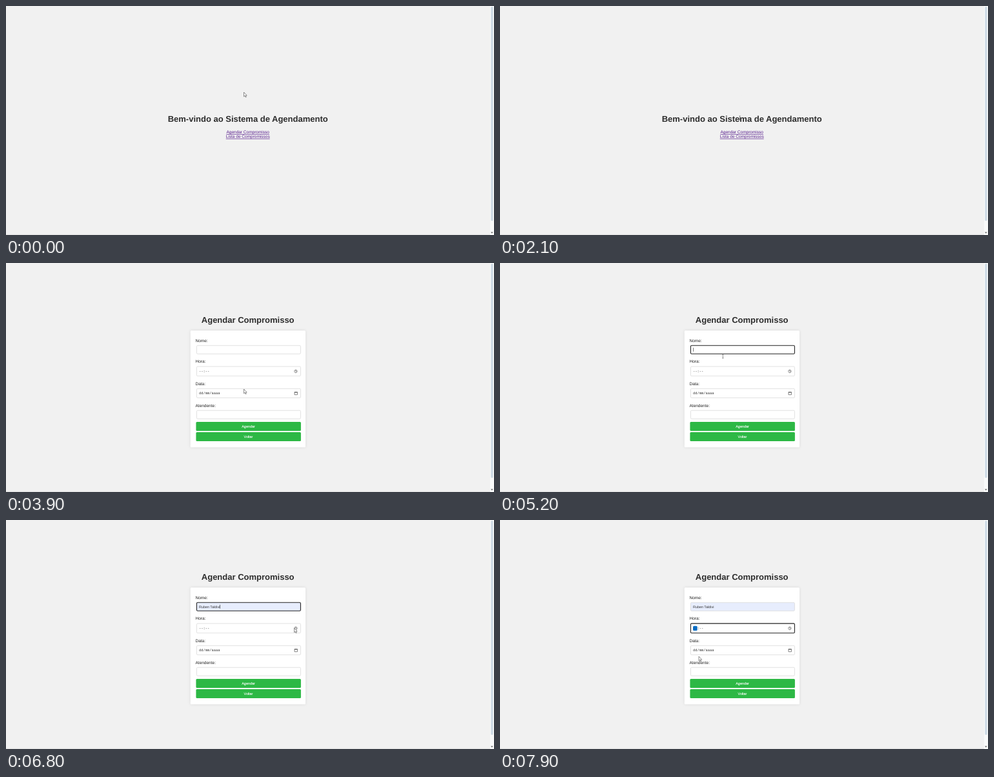
These frames come from a looping animation (756x356 px, 8000 ms). An HTML page:

```html
<!DOCTYPE html>
<html lang="pt-BR">
<head>
<meta charset="utf-8">
<title>Sistema de Agendamento</title>
<style>
  html, body { margin: 0; width: 100%; height: 100%; overflow: hidden; background: #f1f1f1; }
  svg { display: block; }
  text { font: 6.5px "Liberation Sans", Arial, sans-serif; fill: #222; text-rendering: geometricPrecision; }
  .title { font-size: 13px; font-weight: bold; fill: #2d2d2d; text-anchor: middle; }
  .link { fill: #551a8b; text-anchor: middle; text-decoration: underline; }
  .value { font-size: 5.42px; fill: #333; }
  .mono { font-family: "Liberation Mono", monospace; }
  .button { font-size: 5.42px; fill: #fff; stroke: #fff; stroke-width: .12; text-anchor: middle; }
  .field { fill: #fff; stroke: #dadada; stroke-width: .8; }
  .filled { fill: #e7edfd; }
  .focus { stroke: #222; stroke-width: 1.1; }
  .card { fill: #fff; filter: drop-shadow(0 0 2px rgba(0, 0, 0, .1)); }
  .icon { fill: none; stroke: #333; stroke-width: .6; }
  .cursor { fill: #fff; stroke: #444; stroke-width: .6; stroke-linejoin: round; }
</style>
</head>
<body>
<svg width="756" height="356">
  <rect y="355" width="750" height="1" fill="#e2e2e2"/>
  <rect x="750" width="6" height="356" fill="#f9fafa"/>
  <rect x="751.3" y="1" width="3.2" height="333" rx="1.5" fill="#ccd9e4"/>
  <path d="M751 351.5h3.6l-1.8 2z" fill="#555"/>
  <g id="home"></g>
  <g id="form"></g>
  <path id="cursor" class="cursor"/>
</svg>
<script>
const LOOP = 8000, STEP = 100, CENTER = 374.7, LEFT = 295.4;
const NAME = "Ruben Taldivi";
const $ = id => document.getElementById(id);
const text = (kind, x, y, content, id = "") =>
  `<text id="${id}" class="${kind}" x="${x}" y="${y}">${content}</text>`;
const box = (kind, x, y, w, h, id = "") =>
  `<rect id="${id}" class="${kind}" x="${x}" y="${y}" width="${w}" height="${h}" rx="1.5"/>`;

$("home").innerHTML = text("title", CENTER, 180.4, "Bem-vindo ao Sistema de Agendamento") +
  ["Agendar Compromisso", "Lista de Compromissos"]
    .map((label, i) => text("link", CENTER, 198 + i * 7.4, label)).join("");

// Labels and fields stack downwards; each row gives its label, height and content.
function buildForm() {
  const fields = [
    ["Nome:", 13, y => text("value", 299, y, "", "name")],
    ["Hora:", 14.8, y => box("", 299, y - 5.5, 6.6, 7.2, "hourMark") + text("value mono", 299, y, "--:--") +
      `<path class="icon" d="M446.7 ${y - 2}a2.2 2.2 0 1 1 0 .1M448.9 ${y - 3.5}v1.6l1.1.6"/>`],
    ["Data:", 14.3, y => text("value mono", 299, y, "dd/mm/aaaa") +
      `<path class="icon" d="M447 ${y - 3.8}h4.4v4.1H447zm0 .6h4.4"/>`],
    ["Atendente:", 13, () => ""]
  ];
  let y = 122.7;
  let markup = text("title", CENTER, 92.6, "Agendar Compromisso") + box("card", 285.7, 105, 178.3, 181.5);
  for (const [label, height, content] of fields) {
    markup += text("", 293.5, y, label) + box("field", LEFT, y + 5.6, 161, height, label) +
      content(y + 7.6 + height / 2);
    y += height + 19.6;
  }
  ["Agendar", "Voltar"].forEach((label, i) => {
    const top = 247.1 + i * 15.8;
    markup += `<g fill="#2db845">${box("", 294.4, top, 162.5, 14)}</g>` + text("button", 375.5, top + 9, label);
  });
  return markup + `<rect id="caret" y="131.7" width=".6" height="6" fill="#222"/>`;
}
$("form").innerHTML = buildForm();
$("hourMark").setAttribute("fill", "#0a6fc8");

const shapes = {
  arrow: "M0 0V6.8L1.6 5.4 2.7 7.8 3.7 7.4 2.6 5.1H4.7Z",
  hand: "M1 .4Q1.8-.2 2.2.6V3L5 3.7V6L4.3 8H1.8L0 5.2 1 4.8Z",
  beam: "M-1-3H1M0-3V3M-1 3H1"
};

// Pointer moves: start, end, target x, target y. It rests in between.
const moves = [
  [0, 1000, 313, 118], [1600, 1800, 345, 64], [1800, 2100, 371.5, 174],
  [2100, 2500, 352, 197], [2500, 2800, 368.5, 196], [4200, 4700, 345, 135],
  [5100, 5400, 346, 165], [5600, 6500, 413, 167], [6500, 6800, 446.5, 168],
  [7400, 7900, 308, 212]
];
const progress = (t, start, end) => Math.min(1, Math.max(0, (t - start) / (end - start)));

function pointAt(t) {
  let x = 368.5, y = 134;
  for (const [start, end, toX, toY] of moves) {
    const k = progress(t, start, end);
    x += (toX - x) * k;
    y += (toY - y) * k;
  }
  return [x, y];
}

function cursorOver(inForm, y) {
  if (inForm) return y > 128 && y < 150 ? "beam" : "arrow";
  return y > 191 ? "hand" : y > 168 ? "beam" : "arrow";
}

function draw(now) {
  const t = Math.floor(now % LOOP / STEP) * STEP;
  const inForm = t >= 3900, onHour = t >= 7000, onName = t >= 4800 && !onHour;
  $("home").style.display = inForm ? "none" : "";
  $("form").style.display = inForm ? "" : "none";

  $("name").textContent = NAME.slice(0, Math.ceil(progress(t, 5600, 6400) * NAME.length));
  $("Nome:").classList.toggle("filled", t >= 6600);
  $("Nome:").classList.toggle("focus", onName);
  $("Hora:").classList.toggle("focus", onHour);
  $("hourMark").style.display = onHour ? "" : "none";
  $("caret").style.display = onName ? "" : "none";
  if (onName) $("caret").setAttribute("x", 299 + $("name").getComputedTextLength());

  const [x, y] = pointAt(t);
  $("cursor").setAttribute("d", shapes[cursorOver(inForm, y)]);
  $("cursor").setAttribute("transform", `translate(${x} ${y})`);
  requestAnimationFrame(draw);
}
requestAnimationFrame(draw);
</script>
</body>
</html>
```
